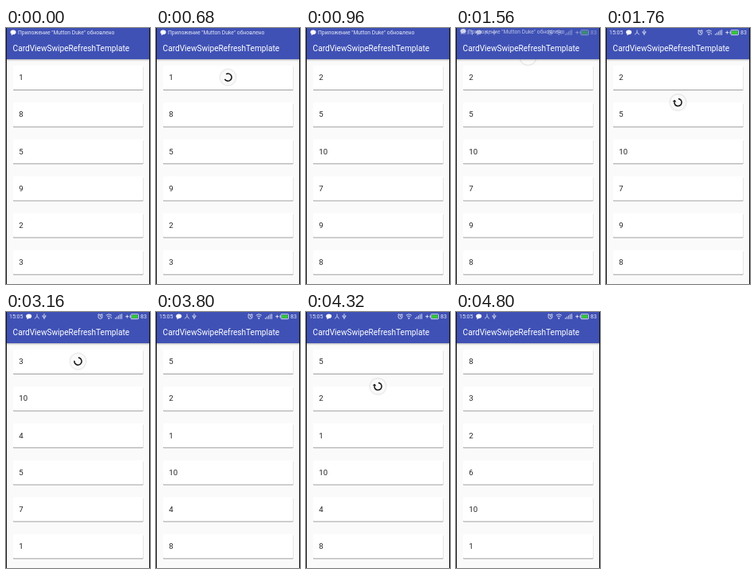
An HTML page that plays this animation: 181x320 px, repeating every 5.32 s.

```html
<!DOCTYPE html>
<html lang="ru">
<head>
<meta charset="utf-8">
<title>Swipe refresh</title>
<style>
html, body { margin: 0; width: 100%; height: 100%; overflow: hidden; background: #fafafa; }
svg { display: block; width: 100vw; height: 100vh; }
text { font-family: Roboto, sans-serif; }
.card { fill: #fff; filter: drop-shadow(0 1px .6px rgba(0,0,0,.36)); }
.disc { fill: #fafafa; filter: drop-shadow(0 .8px 1px rgba(0,0,0,.26)); }
.head { fill: #3f51b5; filter: drop-shadow(0 1px 1px rgba(0,0,0,.3)); }
.num { font-size: 9.6px; fill: #212121; }
.title { font-size: 10.1px; fill: #fff; }
.bar { fill: #e4e7f6; font-size: 7px; }
.note { font-size: 6.8px; }
.line { fill: none; stroke: #e4e7f6; stroke-width: .9; }
</style>
</head>
<body>
<svg viewBox="0 0 181 320">
  <rect width="181" height="320" fill="#fafafa"/>
  <g id="cards"></g>
  <g id="spinner">
    <circle class="disc" r="9.8"/>
    <path id="arc" fill="none" stroke="#111" stroke-width="1.5"/>
    <path id="tip" d="M-2.4 0H2.4L0 2.6Z" fill="#111"/>
  </g>
  <rect class="head" width="181" height="39"/>
  <text class="title" x="8.6" y="28.7">CardViewSwipeRefreshTemplate</text>
  <g id="note" class="bar">
    <path d="M5.5 5.2a3.5 2.8 0 1 1 3.5 2.8l-2.4 1.2.3-1.6a3 2.8 0 0 1-1.4-2.4Z" fill="#fff"/>
    <text class="note" x="15" y="8.2">Приложение "Mutton Duke" обновлено</text>
  </g>
  <g id="status" class="bar">
    <text x="4" y="8.3">15:05</text>
    <path d="M25.2 5.2a3.5 2.8 0 1 1 3.5 2.8l-2.4 1.2.3-1.6a3 2.8 0 0 1-1.4-2.4Z" fill="#fff"/>
    <path class="line" d="M39 2.5V5.6L36.2 8.3M39 5.6L41.8 8.3"/>
    <path class="line" d="M48 2V9M46.2 4V6L48 7.2L49.8 6V4" stroke-width=".7"/>
    <circle class="line" cx="118.5" cy="5.8" r="2.6"/>
    <path class="line" d="M118.5 4.3V6H119.8M115.4 3.6L117 2.2M121.6 3.6L120 2.2"/>
    <path class="line" d="M125.8 4.2Q129.3 1.2 132.8 4.2M127.2 6Q129.3 4.2 131.4 6"/>
    <circle cx="129.3" cy="7.9" r=".9"/>
    <path id="blip" d="M131.2 6.6H133.2L132.2 8.6Z"/>
    <path class="line" d="M137.5 8.8V7M139.5 8.8V5.7M141.5 8.8V4.3M143.5 8.8V2.8M145.5 8.8V2.3"/>
    <path class="line" d="M150.3 5.6H154.3M152.3 3.6V7.6"/>
    <rect class="line" x="157" y="2.7" width="9.6" height="6" rx=".8"/>
    <rect x="158" y="3.6" width="7.6" height="4.2" fill="#35c836"/>
    <rect x="155.6" y="4.5" width="1" height="2.4"/>
    <text x="169" y="8.3">83</text>
  </g>
  <path d="M0 0H1V320H0ZM180 0H181V320H180Z" fill="#111"/>
</svg>
<script>
const LOOP = 5320, STEP = 40, REST = 61.6, MAX = 93, SHRINK = 120;
const first = [1, 8, 5, 9, 2, 3];
// path: [time, spinner centre]; turn: arc start at rest; done: when the new list arrives
const pulls = [
  { path: [[160, 42], [320, 78], [440, MAX], [520, MAX], [640, REST]], turn: -130, done: 840, list: [2, 5, 10, 7, 9, 8] },
  { path: [[1480, 20], [1560, 36.4], [1720, MAX], [1800, MAX], [1920, REST]], turn: -85, done: 2080, list: [3, 10, 4, 5, 7, 1] },
  { path: [[2920, 64], [3000, MAX], [3040, MAX], [3160, REST]], turn: -85, done: 3440, list: [5, 2, 1, 10, 4, 8] },
  { path: [[4160, 56], [4280, MAX], [4320, MAX], [4440, REST]], turn: -85, done: 4680, list: [8, 3, 2, 6, 10, 1] }
];

const $ = id => document.getElementById(id);
const clamp = (v, a = 0, b = 1) => Math.min(b, Math.max(a, v));
const smooth = v => v * v * (3 - 2 * v);

function make(tag, attrs) {
  const el = document.createElementNS('http://www.w3.org/2000/svg', tag);
  for (const k in attrs) el.setAttribute(k, attrs[k]);
  return $('cards').appendChild(el);
}

const labels = first.map((n, i) => {
  const y = 47 + i * 46.15;
  make('rect', { class: 'card', x: 9, y, width: 163.5, height: 30, rx: 1 });
  return make('text', { class: 'num', x: 16.3, y: y + 18.3 });
});

function along(path, t) {
  const i = path.findIndex(p => p[0] > t);
  if (i < 0) return path[path.length - 1][1];
  const [t0, y0] = path[i - 1], [t1, y1] = path[i];
  const u = (t - t0) / (t1 - t0);
  return y0 + (y1 - y0) * (y1 < y0 ? smooth(u) : u);
}

function point(deg, r = 4.6) {
  const a = deg * Math.PI / 180;
  return [r * Math.cos(a), r * Math.sin(a)].map(v => v.toFixed(2)).join(' ');
}

function drawSpinner({ path, turn, done }, t) {
  const y = along(path, t), rest = path[path.length - 1][0];
  const peak = path.find(p => p[1] === MAX)[0];
  let start, sweep, alpha = 1;
  if (t < rest) {
    const p = t >= peak ? 1 : clamp((y - 36) / (MAX - 36));
    sweep = 275 * p;
    start = turn - 75 * (1 - p);
    alpha = p < .8 ? .35 * clamp(p * 3) : 1;
  } else {
    const age = t - rest;
    sweep = 275 - 250 * smooth(clamp(age / 666));
    start = turn + .16 * age + 275 - sweep;
  }
  const end = start + sweep;
  const scale = 1 - clamp((t - done) / SHRINK);
  $('spinner').setAttribute('transform', `translate(90.5 ${y}) scale(${scale})`);
  $('arc').setAttribute('d', `M${point(start)}A4.6 4.6 0 ${sweep > 180 ? 1 : 0} 1 ${point(end)}`);
  $('arc').setAttribute('opacity', alpha);
  $('tip').setAttribute('transform', `translate(${point(end)}) rotate(${end})`);
  $('tip').setAttribute('opacity', t < rest ? alpha : 0);
}

function draw(time) {
  const t = Math.floor(time % LOOP / STEP) * STEP;
  const list = pulls.reduce((cur, p) => t >= p.done ? p.list : cur, first);
  labels.forEach((el, i) => { el.textContent = list[i]; });

  const pull = pulls.find(p => t >= p.path[0][0] && t < p.done + SHRINK);
  $('spinner').style.display = pull ? '' : 'none';
  if (pull) drawSpinner(pull, t);

  const swap = clamp((t - 1440) / 240);
  $('note').setAttribute('opacity', 1 - swap * swap);
  $('note').setAttribute('transform', `translate(0 ${-3 * swap})`);
  $('status').setAttribute('opacity', swap);
  $('blip').setAttribute('opacity', t < 3800 ? .8 : 0);
}

function tick() {
  draw(performance.now());
  requestAnimationFrame(tick);
}
tick();
</script>
</body>
</html>
```
